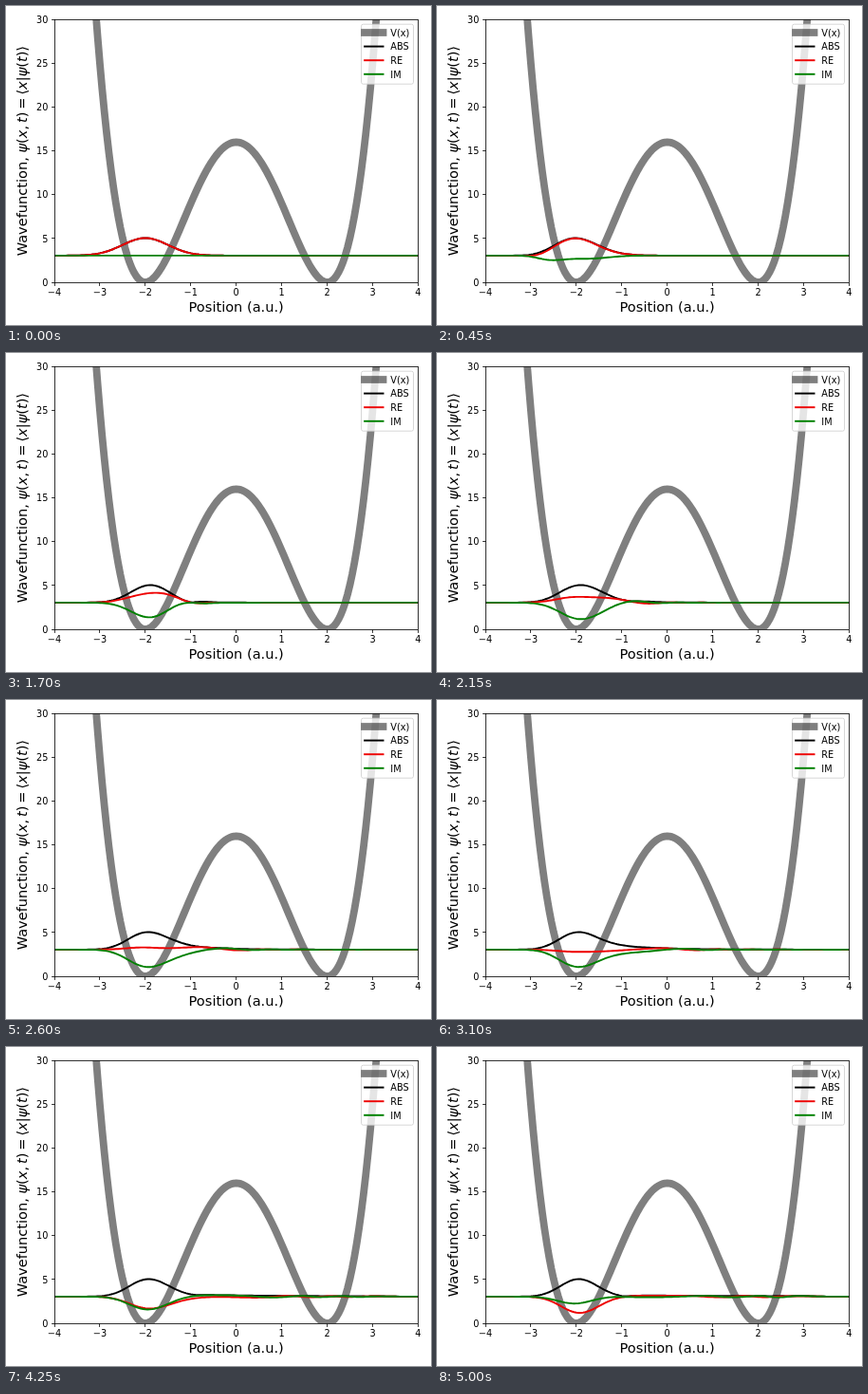
An HTML page with a canvas for the animation above (5050 ms loop, 448x336 px).

```html
<!DOCTYPE html>
<html lang="en">
<head>
<meta charset="utf-8">
<title>Wave packet in a double well</title>
<style>
  html, body { margin: 0; width: 100%; height: 100%; overflow: hidden; background: #fff; }
  canvas { display: block; width: 448px; height: 336px; }
</style>
</head>
<body>
<canvas id="stage" width="448" height="336"></canvas>
<script>
const ctx = document.getElementById('stage').getContext('2d');
const FRAMES = 101, FRAME_MS = 50;
const LEFT = 51, RIGHT = 434.4, TOP = 14.3, BOTTOM = 291;
const FONT = '"DejaVu Sans", sans-serif';
const RED = '#ee0000', GREEN = '#008000';

const toX = x => LEFT + (x + 4) / 8 * (RIGHT - LEFT);
const toY = y => BOTTOM - y / 30 * (BOTTOM - TOP);
const snap = v => Math.floor(v) + 0.5;
const potential = x => (x * x - 4) ** 2;

// Schrödinger equation, hbar = m = 1, staggered leapfrog on [-4, 4].
const N = 640, DX = 8 / N, DT = 1e-4, STEPS = 100;
const gridX = i => -4 + i * DX;
const V = Float64Array.from({ length: N + 1 }, (_, i) => potential(gridX(i)));
const ALPHA = 4;
const ENERGY = ALPHA / 4 + 8 / ALPHA + 0.75 / ALPHA ** 2;

function addHamiltonian(target, source, factor) {
  const k = 0.5 / (DX * DX);
  for (let i = 1; i < N; i++) {
    target[i] += factor * (k * (2 * source[i] - source[i - 1] - source[i + 1]) + V[i] * source[i]);
  }
}

function simulate() {
  const re = Float64Array.from(V, (_, i) => Math.exp(-ALPHA / 2 * (gridX(i) + 2) ** 2));
  const im = new Float64Array(N + 1);
  const frames = [];
  for (let f = 0; f < FRAMES; f++) {
    const abs = re.map((r, i) => Math.hypot(r, im[i]));
    const scale = 2 / Math.max(...abs);
    const lift = values => values.map(v => ENERGY + scale * v);
    frames.push({ abs: lift(abs), re: lift(re), im: lift(im) });
    addHamiltonian(im, re, -DT / 2);
    for (let s = 0; s < STEPS; s++) {
      addHamiltonian(re, im, DT);
      addHamiltonian(im, re, s < STEPS - 1 ? -DT : -DT / 2);
    }
  }
  return frames;
}

function stroke(points, color, width, cap = 'square') {
  ctx.beginPath();
  points.forEach(([x, y]) => ctx.lineTo(x, y));
  ctx.strokeStyle = color;
  ctx.lineWidth = width;
  ctx.lineCap = cap;
  ctx.lineJoin = 'round';
  ctx.stroke();
}

function curve(values, color, width) {
  const points = [];
  for (let i = 0; i <= N; i += 4) points.push([toX(gridX(i)), toY(values[i])]);
  stroke(points, color, width);
}

function text(string, x, y, size, align = 'left', style = '') {
  ctx.font = `${style} ${size}px ${FONT}`;
  ctx.textAlign = align;
  ctx.fillStyle = '#000';
  ctx.fillText(string, x, y);
}

function drawAxes() {
  const x0 = snap(LEFT), x1 = snap(RIGHT), y0 = snap(TOP), y1 = snap(BOTTOM);
  ctx.strokeStyle = '#000';
  ctx.lineWidth = 0.8;
  ctx.lineJoin = 'miter';
  ctx.strokeRect(x0, y0, x1 - x0, y1 - y0);
  for (let x = -4; x <= 4; x++) {
    const px = snap(toX(x));
    stroke([[px, y1], [px, y1 + 3.4]], '#000', 0.8, 'butt');
    text(String(x).replace('-', '\u2212'), toX(x), 305, 9.72, 'center');
  }
  for (let y = 0; y <= 30; y += 5) {
    const py = snap(toY(y));
    stroke([[x0, py], [x0 - 3.4, py]], '#000', 0.8, 'butt');
    text(y, 44.4, Math.round(toY(y) + 3.7), 9.72, 'right');
  }
  text('Position (a.u.)', (LEFT + RIGHT) / 2, 322, 14.58, 'center');
}

function drawYLabel() {
  const size = 14.58, gap = 0.2 * size;
  // [text, style, gap after]
  const parts = [
    ['Wavefunction, ', '', 0], ['ψ', 'italic', 0], ['(', '', 0], ['x', 'italic', 0],
    [',', '', gap], ['t', 'italic', 0], [')', '', gap], ['=', '', gap], ['⟨', '', 0],
    ['x', 'italic', 0], ['|', '', 0], ['ψ', 'italic', 0], ['(', '', 0],
    ['t', 'italic', 0], [')', '', 0], ['⟩', '', 0]
  ];
  const advance = ([string, style, after]) => {
    ctx.font = `${style} ${size}px ${FONT}`;
    return ctx.measureText(string).width + after;
  };
  const total = parts.reduce((sum, part) => sum + advance(part), 0);
  ctx.save();
  ctx.translate(22, (TOP + BOTTOM) / 2);
  ctx.rotate(-Math.PI / 2);
  let x = -total / 2;
  for (const part of parts) {
    text(part[0], x, 0, size, 'left', part[1]);
    x += advance(part);
  }
  ctx.restore();
}

function drawLegend() {
  ctx.beginPath();
  ctx.roundRect(374.5, 19.2, 55, 63, 2);
  ctx.fillStyle = 'rgba(255,255,255,0.8)';
  ctx.fill();
  ctx.strokeStyle = 'rgba(204,204,204,0.8)';
  ctx.lineWidth = 0.97;
  ctx.stroke();
  const rows = [
    ['V(x)', 'rgba(0,0,0,0.5)', 7.78], ['ABS', '#000', 1.94],
    ['RE', RED, 1.94], ['IM', GREEN, 1.94]
  ];
  rows.forEach(([label, color, width], i) => {
    const y = 28 + i * 14.6;
    stroke([[378.1, y], [397.5, y]], color, width);
    text(label, 405.3, Math.round(y + 3.8), 9.72);
  });
}

function draw({ abs, re, im }) {
  ctx.fillStyle = '#fff';
  ctx.fillRect(0, 0, 448, 336);
  ctx.save();
  ctx.beginPath();
  ctx.rect(LEFT, TOP, RIGHT - LEFT, BOTTOM - TOP);
  ctx.clip();
  curve(V, 'rgba(0,0,0,0.5)', 7.78);
  curve(abs, '#000', 1.94);
  curve(re, RED, 1.94);
  curve(im, GREEN, 1.94);
  ctx.restore();
  drawAxes();
  drawYLabel();
  drawLegend();
}

const frames = simulate();
const start = performance.now();
let shown = -1;
function tick() {
  const index = Math.floor((performance.now() - start) / FRAME_MS) % FRAMES;
  if (index !== shown) draw(frames[shown = index]);
  requestAnimationFrame(tick);
}
tick();
</script>
</body>
</html>
```
